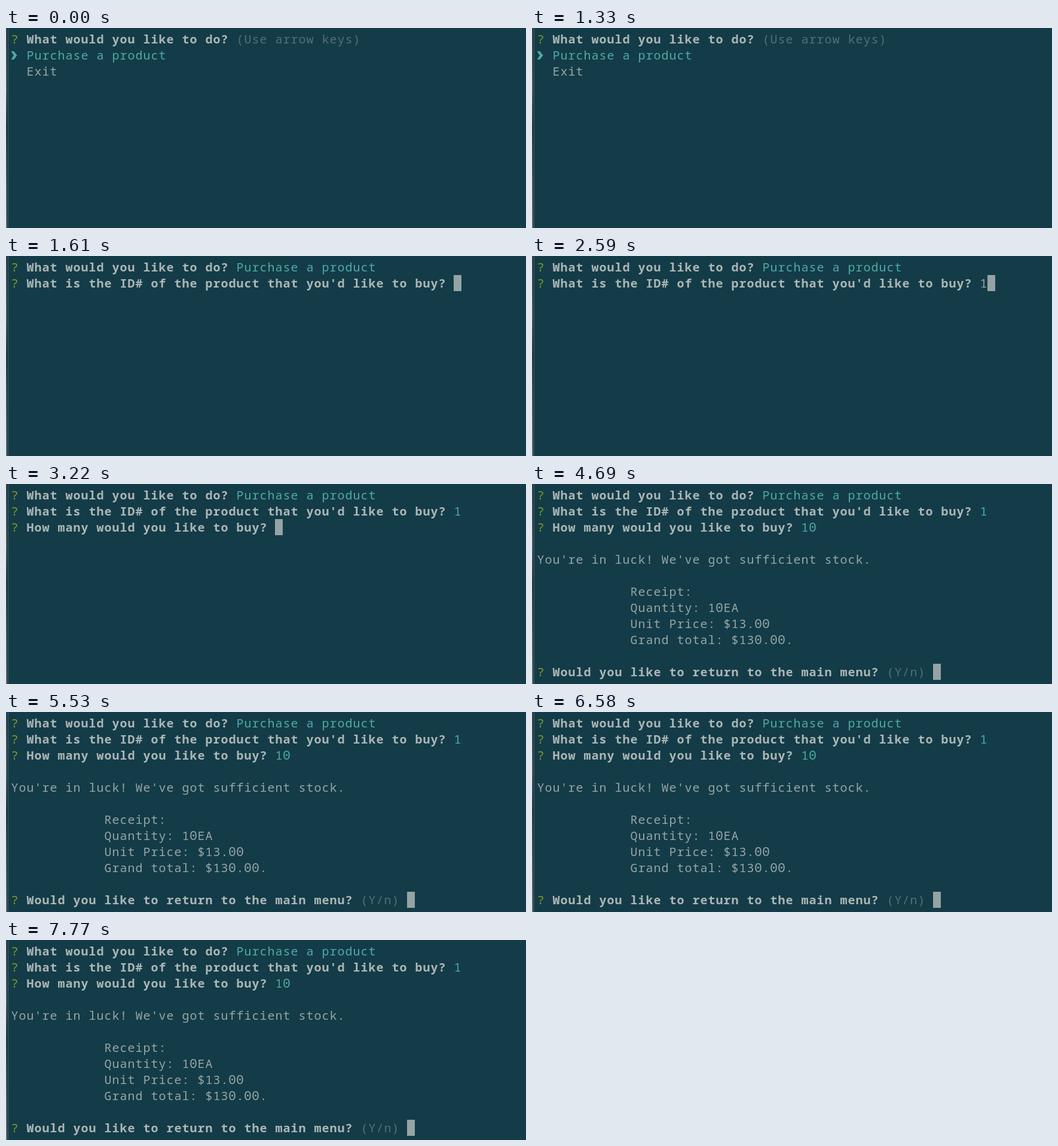
An HTML page for the animation above (8120 ms loop, 870x336 px).

```html
<!DOCTYPE html>
<html lang="en">
<head>
<meta charset="utf-8">
<title>Terminal shop</title>
<style>
html, body { margin: 0; width: 870px; height: 336px; overflow: hidden; background: #133c48; }
svg { display: block; }
text { font: 400 20px "Noto Sans Mono", monospace; letter-spacing: 1px; fill: #98a4a5; }
text.ask { font-weight: 600; fill: #aeb6b5; }
text.mark { fill: #8b9a1e; }
text.pick { font-weight: 500; fill: #50aaa4; }
text.dim { fill: #536f78; }
text.zero { font-family: "Liberation Mono", monospace; font-size: 21.667px; letter-spacing: 0; }
</style>
</head>
<body>
<svg width="870" height="336" viewBox="0 0 870 336">
  <defs>
    <linearGradient id="edge" x2="0" y2="1">
      <stop offset="0" stop-color="#33464f"/>
      <stop offset=".3" stop-color="#566168"/>
      <stop offset=".5" stop-color="#2b3d47"/>
      <stop offset=".75" stop-color="#505c64"/>
      <stop offset="1" stop-color="#6a757a"/>
    </linearGradient>
  </defs>
  <rect width="870" height="336" fill="#133c48"/>
  <rect width="2" height="336" fill="url(#edge)"/>
  <rect x="2" width="1" height="336" fill="#0d2731"/>
  <rect x="3" width="1" height="336" fill="#45616a"/>
  <g id="screen"></g>
</svg>
<script>
const LOOP = 8120, CELL = 13, LINE = 27, LEFT = 8;
const screen = document.getElementById('screen');
const colX = col => LEFT + col * CELL;

// Places each word on the character grid; zeros use a dotted face.
function write(row, col, str, kind = '') {
  let out = '';
  for (const m of str.matchAll(/0+|[^0 ]+/g)) {
    const zero = m[0][0] === '0';
    const x = colX(col + m.index) + (zero ? 0 : 0.5);
    out += `<text x="${x}" y="${26 + row * LINE}" class="${kind}${zero ? ' zero' : ''}">${m[0]}</text>`;
  }
  return out;
}

const cursor = (row, col) =>
  `<rect x="${colX(col)}" y="${5 + row * LINE}" width="13" height="27" fill="#96a3a4"/>`;

// One prompt line: mark, question, reply and an optional cursor after it.
function prompt(row, question, reply = '', kind = 'pick', gap = -1) {
  const col = question.length + 3;
  return write(row, 0, '?', 'mark') + write(row, 2, question, 'ask') + write(row, col, reply, kind) +
    (gap < 0 ? '' : cursor(row, col + reply.length + gap));
}

const TASK = 'What would you like to do?';
const ITEM = "What is the ID# of the product that you'd like to buy?";
const COUNT = 'How many would you like to buy?';
const BACK = 'Would you like to return to the main menu?';

const menu = prompt(0, TASK, '(Use arrow keys)', 'dim') +
  '<path d="M8.5 39h4.5l5.5 7-5.5 7H8.5l4.5-7z" fill="#50aaa4"/>' +
  write(1, 2, 'Purchase a product', 'pick') + write(2, 2, 'Exit');
const chosen = prompt(0, TASK, 'Purchase a product');
const listed = chosen + prompt(1, ITEM, '1');
const receipt = ['Receipt:', 'Quantity: 10EA', 'Unit Price: $13.00', 'Grand total: $130.00.']
  .map((line, i) => write(6 + i, 12, line)).join('');
const done = listed + prompt(2, COUNT, '10') +
  write(4, 0, "You're in luck! We've got sufficient stock.") + receipt +
  prompt(11, BACK, '(Y/n)', 'dim', 1);

const steps = [
  [0, menu],
  [1400, chosen + prompt(1, ITEM, '', '', 0)],
  [2240, chosen + prompt(1, ITEM, '1', '', 0)],
  [3150, listed + prompt(2, COUNT, '', '', 0)],
  [4060, listed + prompt(2, COUNT, '1', '', 0)],
  [4340, listed + prompt(2, COUNT, '10', '', 0)],
  [4620, done]
];

let shown = null;
function draw(t) {
  const view = steps.filter(s => s[0] <= t).pop()[1];
  if (view !== shown) screen.innerHTML = shown = view;
}

const start = performance.now();
function tick() {
  draw((performance.now() - start) % LOOP);
  requestAnimationFrame(tick);
}
draw(0);
requestAnimationFrame(tick);
</script>
</body>
</html>
```
